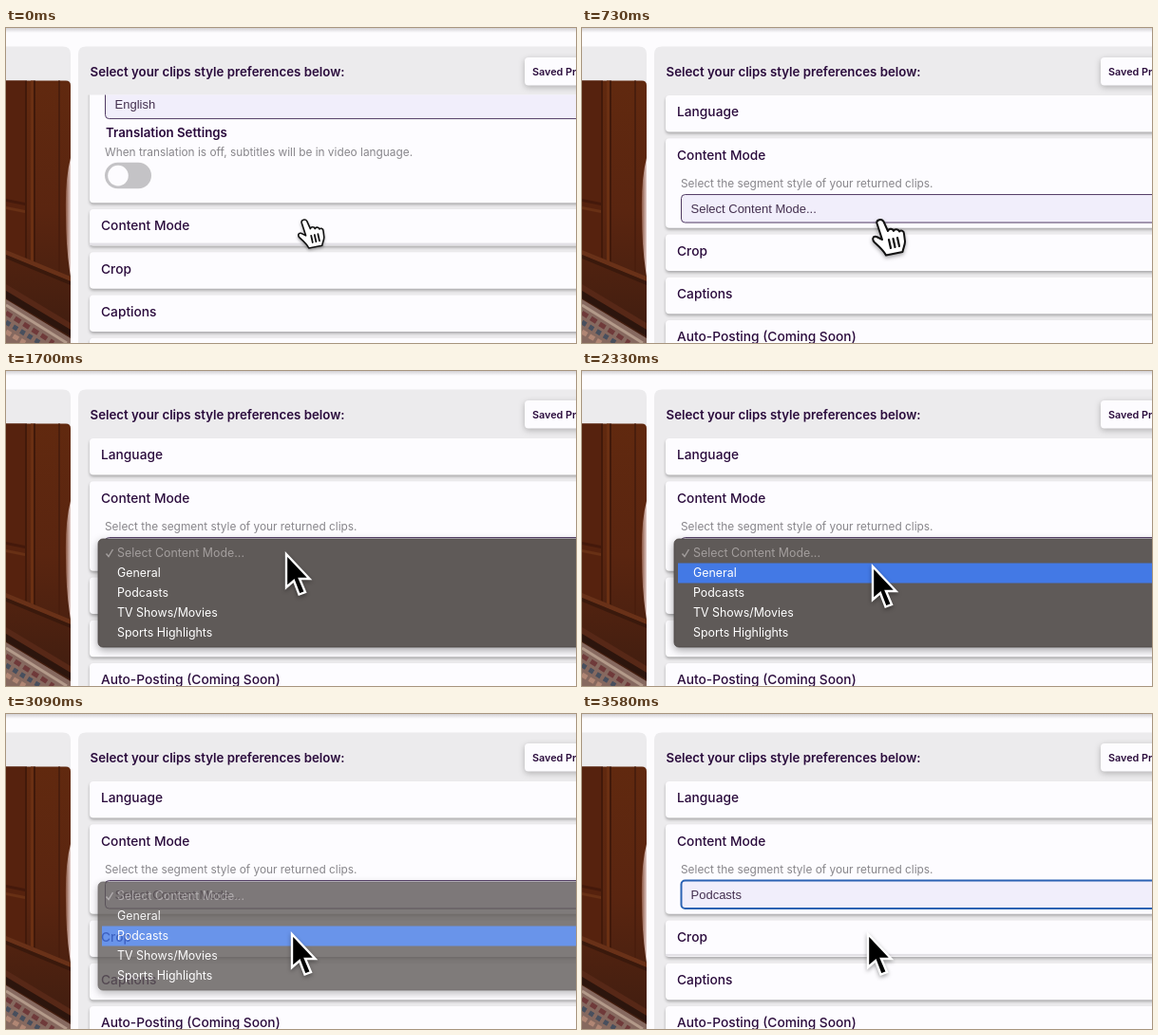
An HTML page that plays this animation: 600 by 332 pixels, repeating every 3.61 s.

```html
<!DOCTYPE html>
<html lang="en">
<head>
<meta charset="utf-8">
<title>Clip style preferences</title>
<style>
html, body { margin: 0; width: 100%; height: 100%; overflow: hidden; background: #fdfcfe; }
#stage { display: block; width: 600px; height: 332px; }
text { font-family: Inter, "Open Sans", sans-serif; fill: #2a0b3c; white-space: pre; }
.title { font-size: 13.27px; font-weight: 600; }
.head { font-size: 13.75px; font-weight: 500; }
.note { font-size: 11.87px; fill: #88868b; }
.value { font-family: "Liberation Sans", Arial, sans-serif; font-size: 13px; fill: #44304f; }
.item { font-size: 12.4px; fill: #fff; }
.off { fill: #a39e9d; }
.card { fill: #fdfcff; filter: drop-shadow(0 2px 1.7px rgba(0,0,0,.28)); }
.field { fill: #f1eefb; stroke: #4f3962; stroke-width: 1; }
.field.focus { stroke: #2b62b3; stroke-width: 2; }
#cursor { filter: drop-shadow(0 2px 2px rgba(0,0,0,.35)); }
</style>
</head>
<body>
<svg id="stage" viewBox="0 0 600 332">
  <defs>
    <linearGradient id="topShade" x2="0" y2="1">
      <stop offset="0" stop-color="#d3d1d5"/><stop offset="1" stop-color="#fdfcfe"/>
    </linearGradient>
    <linearGradient id="wood" x2="0" y2="1">
      <stop offset="0" stop-color="#61290f"/><stop offset=".5" stop-color="#5a2510"/><stop offset="1" stop-color="#3f1d10"/>
    </linearGradient>
    <linearGradient id="sleeve">
      <stop offset="0" stop-color="#8a5540"/><stop offset="1" stop-color="#e3cdca"/>
    </linearGradient>
    <clipPath id="photoClip"><path d="M0 55.600H63Q68 55.600 68 60.600V332H0z"/></clipPath>
    <clipPath id="listClip"><path d="M80 70.5H600V332H80z"/></clipPath>
  </defs>

  <rect width="600" height="332" fill="#fdfcfe"/>
  <rect width="600" height="5" fill="url(#topShade)"/>
  <path d="M0 19.5H60Q68 19.5 68 27.5V332H0z" fill="#ecebed"/>
  <path d="M76 332V27.5Q76 19.5 84 19.5H600V332z" fill="#ecebed"/>

  <g clip-path="url(#photoClip)">
    <rect y="55" width="68" height="277" fill="url(#wood)"/>
    <path d="M0 55H20V242L0 234z" fill="#56220e"/>
    <path d="M20 55H22V243L20 242z" fill="#42190a"/>
    <path d="M26 55H29V246L26 245z" fill="#6b3013"/>
    <path d="M29 55H31V247L29 246z" fill="#41190a"/>
    <path d="M55 55H57V258L55 257z" fill="#4a1e0d"/>
    <path d="M0 180L20 184V187L0 183z" fill="#44190b"/>
    <path d="M0 188L20 192V195L0 191z" fill="#683015"/>
    <path d="M0 234L68 262V267L0 239z" fill="#693118"/>
    <path d="M0 239L68 267V271L0 243z" fill="#3a190c"/>
    <path d="M0 270L68 311V318L0 277z" fill="#572817"/>
    <path d="M0 277L68 318V325L0 285z" fill="#2c150d"/>
    <path d="M68 137Q62 160 63 196Q63 232 68 262z" fill="url(#sleeve)"/>
    <path d="M0 286L68 327V332H0z" fill="#86695f"/>
    <path d="M0 292L64 332" stroke="#b39a8a" stroke-width="3"/>
    <path d="M0 300L50 332" stroke="#6f3a3a" stroke-width="5" stroke-dasharray="7 4"/>
    <path d="M0 310L36 332" stroke="#484f5d" stroke-width="5" stroke-dasharray="5 4"/>
    <path d="M0 320L20 332" stroke="#b08674" stroke-width="5" stroke-dasharray="6 3"/>
  </g>

  <text class="title" x="88.5" y="50.5">Select your clips style preferences below:</text>
  <rect x="546" y="31" width="80" height="29.5" rx="4" fill="#fdfcff"
    style="filter:drop-shadow(0 2px 3px rgba(0,0,0,.25))"/>
  <text x="554" y="50" font-size="10.8" font-weight="600">Saved Presets</text>

  <g id="list" clip-path="url(#listClip)"></g>

  <g id="menu">
    <rect x="97" y="177" width="530" height="114" rx="5" fill="#5f5a58" stroke="#4b4645" stroke-width=".8"
      style="filter:drop-shadow(0 3px 4px rgba(0,0,0,.35))"/>
    <rect id="mark" x="101" width="520" height="21" fill="#4379e5"/>
    <path d="M105.5 192.5L108 195.5L112.5 188" fill="none" stroke="#a39e9d" stroke-width="1.4"/>
  </g>

  <g id="cursor">
    <g id="hand" fill="#fff" stroke="#111" stroke-width="2" stroke-linejoin="round" stroke-linecap="round">
      <path d="M-3.500 4C-4.500 0 1.500 -1.500 3.500 2L8 12C9 9 13 9 14 12C15 9.500 19 9.500 20 12.500C22 10.500 25 12 25 15L26 23C26 27 24 30 23.500 34L6 37.500C4 33 -1 28.500 -6 24C-9 21 -8 17 -4 18L2 21z"/>
      <path d="M9 21L11 30M13.500 20L15.500 29M18 19L20 28" fill="none" stroke-width="2.2"/>
    </g>
    <path id="arrow" d="M0 0V35L8 28L13.500 42.500L20 40L14 26H24.500z" fill="#000" stroke="#fff" stroke-width="2.4"/>
  </g>
</svg>
<script>
const LOOP = 3610, ROW = 38.5, GAP = 6.75, TOP = 71;
const LANG_BODY = 139, MODE_BODY = 55.9, SCROLL = 64.2;
const $ = id => document.getElementById(id);

function add(parent, tag, attrs, text) {
  const el = document.createElementNS("http://www.w3.org/2000/svg", tag);
  for (const k in attrs) el.setAttribute(k, attrs[k]);
  if (text) el.textContent = text;
  parent.appendChild(el);
  return el;
}
const label = (parent, cls, x, y, text) => add(parent, "text", { class: cls, x, y }, text);
const clamp = v => Math.max(0, Math.min(1, v));
const ramp = (t, a, b) => clamp((t - a) / (b - a));
const smooth = p => p * p * (3 - 2 * p);
const mix = (a, b, p) => a + (b - a) * p;
// rises to one at c and falls back
const press = (t, c, half) => smooth(clamp(1 - Math.abs(t - c) / half));

function makePanel(title) {
  const g = add($("list"), "g", {});
  const card = add(g, "rect", { class: "card", x: 88, width: 540, rx: 4 });
  const box = add(g, "svg", { x: 88, width: 512, overflow: "hidden" });
  const inner = add(box, "g", { transform: "translate(-88 0)" });
  const line = add(inner, "rect", { x: 88, y: 35.5, width: 512, height: 2.5, fill: "#e3e1e6" });
  label(inner, "head", 100, 22.4, title);
  return {
    inner,
    place(y, h, hover) {
      g.setAttribute("transform", `translate(0 ${y})`);
      card.setAttribute("height", h);
      box.setAttribute("height", h);
      line.setAttribute("opacity", hover);
    }
  };
}

function makeField(parent, note, text) {
  label(parent, "note", 104, 51.8, note);
  const rect = add(parent, "rect", { class: "field", x: 104.5, y: 59.3, width: 520, height: 29.5, rx: 4 });
  return { rect, text: label(parent, "value", 114.5, 78.7, text) };
}

const panels = ["Language", "Content Mode", "Crop", "Captions", "Auto-Posting (Coming Soon)"].map(makePanel);
const lang = panels[0].inner;
makeField(lang, "Choose the original video language.", "English");
label(lang, "title", 105, 108.3, "Translation Settings");
label(lang, "note", 104, 127.8, "When translation is off, subtitles will be in video language.");
add(lang, "rect", { x: 104, y: 135, width: 49, height: 27.5, rx: 13.75, fill: "#c4c3c6" });
add(lang, "circle", { cx: 118, cy: 148.8, r: 10.8, fill: "#fdfcff" });
const mode = makeField(panels[1].inner, "Select the segment style of your returned clips.", "Select Content Mode...");

["Select Content Mode...", "General", "Podcasts", "TV Shows/Movies", "Sports Highlights"].forEach((s, i) =>
  label($("menu"), i ? "item" : "item off", 117, 196 + 21 * i, s));

// start, end, x, y of each cursor move
const moves = [[780, 1500, 295, 193], [1800, 2280, 306, 206], [2400, 2850, 301, 232]];

function cursorAt(t) {
  let x = 314, y = 202;
  for (const [a, b, mx, my] of moves) {
    const p = smooth(ramp(t, a, b));
    x = mix(x, mx, p);
    y = mix(y, my, p);
  }
  return [x, y];
}

// cubic-bezier(.25,.1,.25,1)
function ease(x) {
  let lo = 0, hi = 1, s = .5;
  for (let i = 0; i < 20; i++) {
    s = (lo + hi) / 2;
    const bx = .75 * s * (1 - s) ** 2 + .75 * s * s * (1 - s) + s ** 3;
    if (bx < x) lo = s; else hi = s;
  }
  return .3 * s * (1 - s) ** 2 + 3 * s * s * (1 - s) + s ** 3;
}

function draw(t) {
  const shut = ease(ramp(t, 30, 365)), grow = ease(ramp(t, 30, 315));
  const heights = [ROW + LANG_BODY * (1 - shut), ROW + MODE_BODY * grow, ROW, ROW, ROW];
  const hover = [0, 1 - ramp(t, 270, 450), ramp(t, 3130, 3280), 0, 0];
  let y = TOP - Math.max(0, SCROLL - 70 * shut);
  panels.forEach((panel, i) => {
    panel.place(y, heights[i], hover[i]);
    y += heights[i] + GAP;
  });

  const chosen = t >= 3130;
  mode.text.textContent = chosen ? "Podcasts" : "Select Content Mode...";
  mode.rect.setAttribute("class", chosen ? "field focus" : "field");

  const open = t >= 1590;
  const [cx, cy] = cursorAt(t);
  const row = Math.floor((cy - 181) / 21);
  $("menu").setAttribute("opacity", open ? 1 - ramp(t, 3060, 3210) : 0);
  $("mark").setAttribute("y", 181 + 21 * row + .5);
  $("mark").setAttribute("opacity", row > 0 ? 1 : 0);

  const dip = Math.max(press(t, 0, 180), press(t, 1530, 120), press(t, 2960, 110));
  $("cursor").setAttribute("transform", `translate(${cx} ${cy}) scale(${1 - .2 * dip})`);
  $("hand").setAttribute("visibility", open ? "hidden" : "visible");
  $("arrow").setAttribute("visibility", open ? "visible" : "hidden");
}

const start = performance.now();
function tick() {
  draw((performance.now() - start) % LOOP);
  requestAnimationFrame(tick);
}
tick();
</script>
</body>
</html>
```
